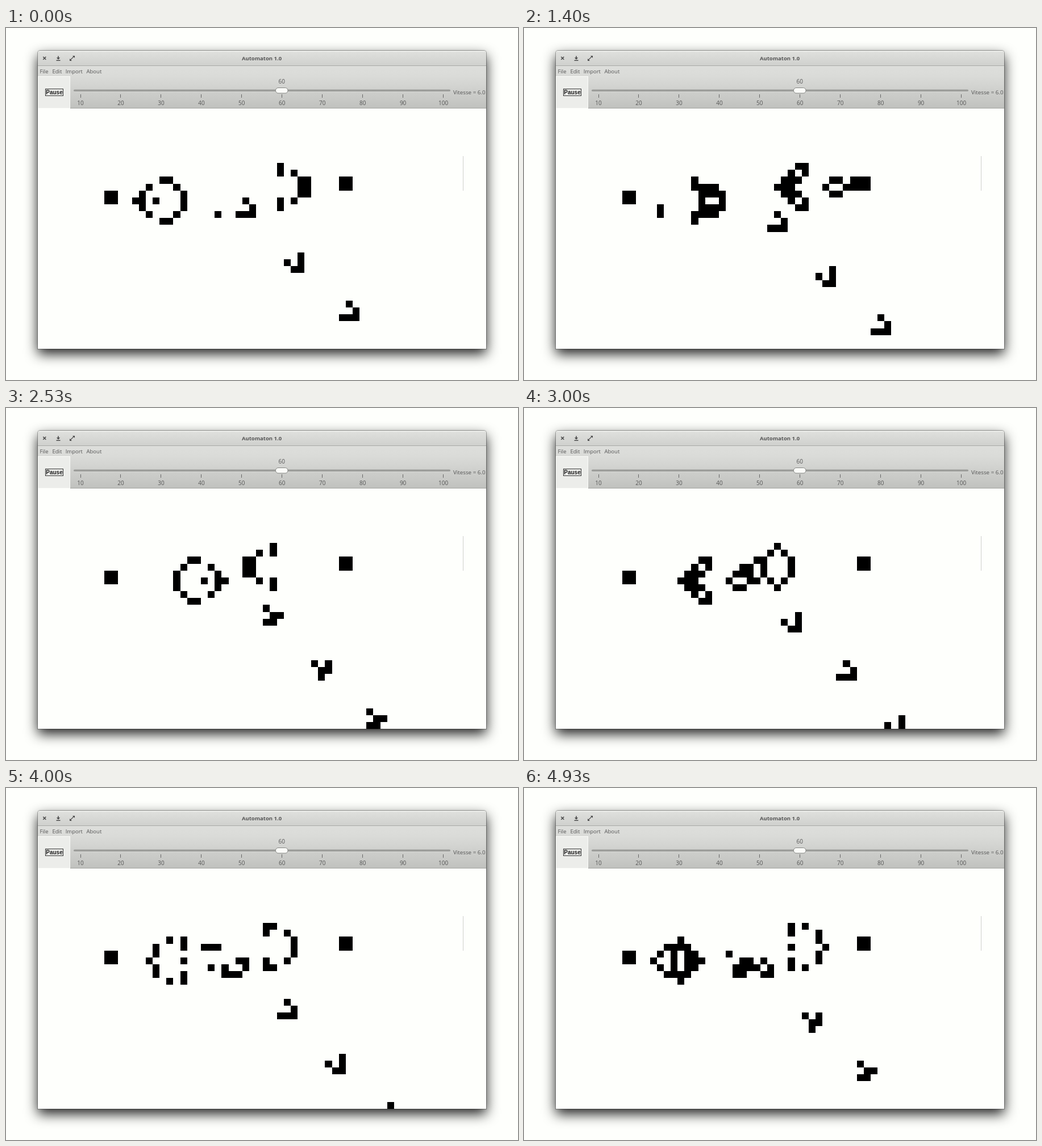
These frames come from a looping animation (901 px wide and 621 px high, 4990 ms). An HTML page:

```html
<!DOCTYPE html>
<html lang="en">
<head>
<meta charset="utf-8">
<title>Automaton 1.0</title>
<style>
  html, body { margin: 0; width: 100%; height: 100%; overflow: hidden; background: #fefffc; }
  .window {
    position: absolute; left: 56px; top: 40px; width: 789px; height: 526px;
    border-radius: 4px 4px 0 0; background: #fefffc;
    box-shadow: 0 0 0 1px rgba(0, 0, 0, .3), 0 9px 22px rgba(0, 0, 0, .88);
  }
  svg { position: absolute; left: 0; top: 0; display: block; }
  text { font: 9.5px "Open Sans", "Noto Sans", sans-serif; fill: #555; }
  .title { font-weight: 700; text-anchor: middle; }
  .scale text { font-size: 10px; text-anchor: middle; }
  .button { font: 700 10px "Liberation Sans", Arial, sans-serif; fill: #222; text-anchor: middle; }
  .icon { stroke: #4a4a4a; stroke-width: 1.6; fill: none; }
</style>
</head>
<body>
<div class="window"></div>
<svg width="901" height="621" viewBox="0 0 901 621">
  <defs>
    <linearGradient id="bar" x2="0" y2="1">
      <stop stop-color="#e0e1de"/><stop offset="1" stop-color="#cfd0cd"/>
    </linearGradient>
    <linearGradient id="tools" x2="0" y2="1">
      <stop stop-color="#dddedb"/><stop offset=".25" stop-color="#dadbd8"/><stop offset="1" stop-color="#c0c1be"/>
    </linearGradient>
  </defs>

  <path d="M56 67V44a4 4 0 0 1 4-4H841a4 4 0 0 1 4 4V67z" fill="url(#bar)"/>
  <path d="M59 41.5H842" stroke="#f0f1ee"/>
  <rect x="56" y="67" width="789" height="75" fill="url(#tools)"/>
  <path d="M56 66.5H845" stroke="#a9aaa7"/>
  <path d="M56 141.5H845" stroke="#a3a4a1"/>

  <path class="icon" d="M65.3 50.8l5 5m0-5l-5 5"/>
  <path class="icon" d="M92 49.5V54M88.5 57.2h7"/>
  <path d="M88.8 52.3h6.4L92 55.8z" fill="#4a4a4a"/>
  <path class="icon" d="M113.5 56.2l5.5-5.5" style="stroke-width:1.2"/>
  <path d="M117 49h4v4zM112 54v4h4z" fill="#4a4a4a"/>
  <text class="title" x="450" y="57.3">Automaton 1.0</text>

  <text x="59.5" y="79.5">File</text>
  <text x="81.5" y="79.5">Edit</text>
  <text x="104.7" y="79.5">Import</text>
  <text x="141.5" y="79.5">About</text>

  <rect x="56.5" y="85.5" width="56" height="56" fill="#ecedea" stroke="#fafbf8"/>
  <rect x="69.5" y="107.5" width="31" height="12" fill="none" stroke="#333"/>
  <text class="button" x="85" y="117">Pause</text>

  <rect x="119" y="108.5" width="663" height="3.5" rx="1.7" fill="#9c9d9a"/>
  <path d="M120 112.5H781" stroke="#d6d7d4"/>
  <rect x="474.5" y="105.5" width="21.5" height="9.5" rx="4.5" fill="#fafbf8" stroke="#858683"/>
  <g class="scale" id="scale"><text x="485.3" y="98">60</text></g>
  <text x="787" y="117" style="font-size:9.8px">Vitesse = 6.0</text>

  <path d="M804.5 226V287" stroke="#cfd0cd"/>
  <path id="cells" shape-rendering="crispEdges"/>
</svg>
<script>
  const LOOP = 4990, PERIOD = 30, FPS = 15;
  const CELL = 12.14, LEFT = 173, TOP = 238.2, ROWS = 27;
  const STRIDE = 1000, PAD = 10;
  const GUN = "24bo$22bobo$12b2o6b2o12b2o$11bo3bo4b2o12b2o$2o8bo5bo3b2o$" +
    "2o8bo3bob2o4bobo$10bo5bo7bo$11bo3bo$12b2o";

  // slider ticks and labels
  let marks = "";
  for (let i = 0; i < 10; i++) {
    const x = 131 + i * 70.95;
    marks += `<path d="M${Math.floor(x) + .5} 117v6" stroke="#666"/>` +
      `<text x="${x.toFixed(1)}" y="136">${(i + 1) * 10}</text>`;
  }
  document.getElementById("scale").insertAdjacentHTML("beforeend", marks);

  function parse(rle) {
    const live = new Set();
    let x = 0, y = 0;
    for (const [, count, tag] of rle.matchAll(/(\d*)([bo$])/g)) {
      for (let n = +count || 1; n > 0; n--) {
        if (tag === "$") { y++; x = 0; continue; }
        if (tag === "o") live.add((y + PAD) * STRIDE + x + PAD);
        x++;
      }
    }
    return live;
  }

  function step(live) {
    const near = new Map();
    for (const key of live)
      for (let dy = -1; dy <= 1; dy++)
        for (let dx = -1; dx <= 1; dx++)
          if (dx || dy) {
            const k = key + dy * STRIDE + dx;
            near.set(k, (near.get(k) || 0) + 1);
          }
    const next = new Set();
    for (const [k, n] of near)
      if (n === 3 || (n === 2 && live.has(k))) next.add(k);
    return next;
  }

  function outline(live) {
    const px = c => Math.round(LEFT + c * CELL);
    const py = r => Math.round(TOP + r * CELL);
    let d = "";
    for (const key of live) {
      const c = key % STRIDE - PAD, r = Math.floor(key / STRIDE) - PAD;
      if (r < ROWS) d += `M${px(c)} ${py(r)}H${px(c + 1)}V${py(r + 1)}H${px(c)}z`;
    }
    return d;
  }

  // run until the glider stream is full, then keep one period
  let live = parse(GUN);
  for (let i = 0; i < PERIOD * 4.5; i++) live = step(live);
  const poses = [], starts = [];
  for (let g = 0; g < PERIOD; g++) {
    poses.push(outline(live));
    starts.push(Math.round(Math.ceil(g * 2.5) * 100 / FPS) * 10);
    live = step(live);
  }

  const cells = document.getElementById("cells");
  const origin = performance.now();
  let shown = -1;
  function draw() {
    const t = (performance.now() - origin) % LOOP;
    let g = PERIOD - 1;
    while (starts[g] > t) g--;
    if (g !== shown) cells.setAttribute("d", poses[shown = g]);
    requestAnimationFrame(draw);
  }
  draw();
</script>
</body>
</html>
```
